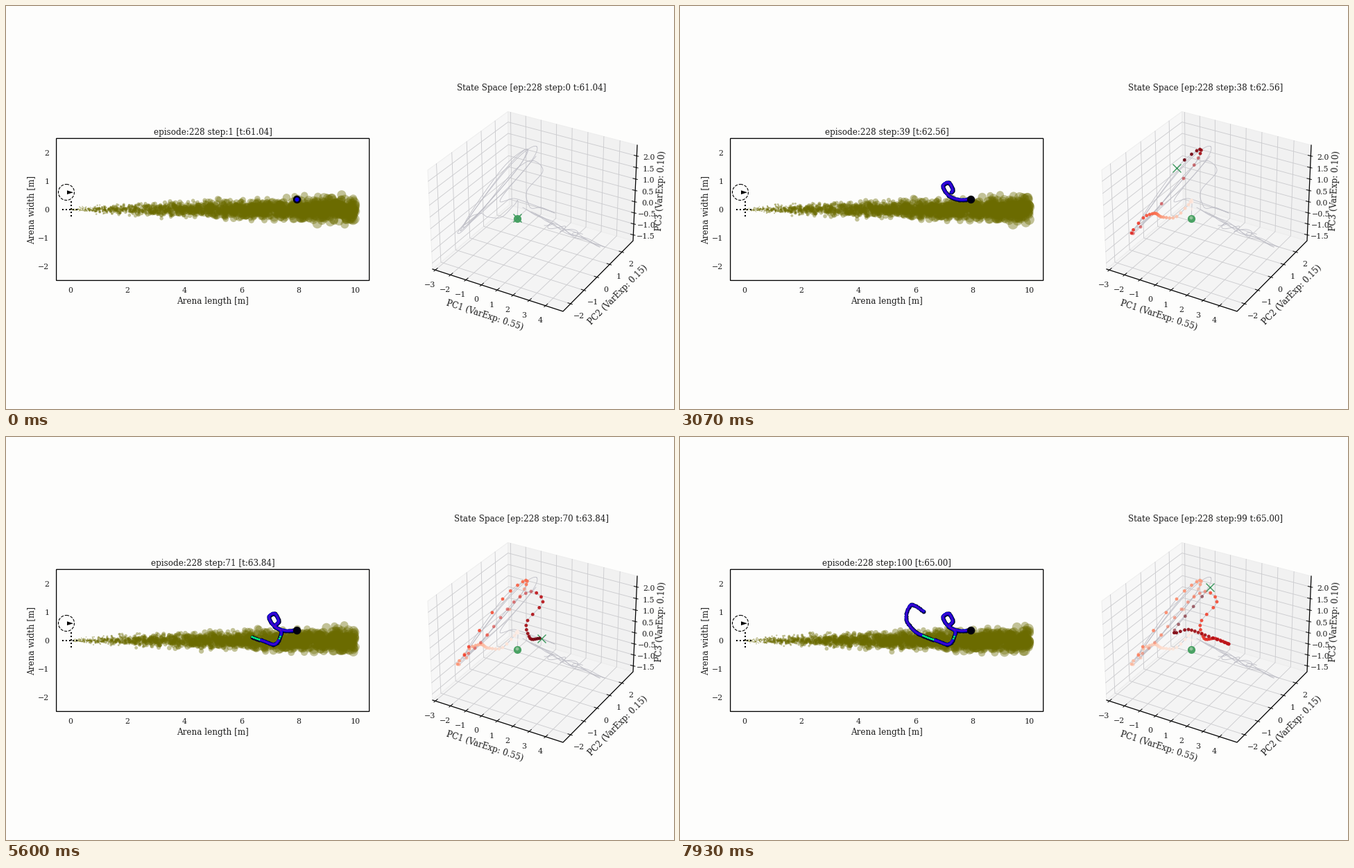
Write a matplotlib script that moves like this. It is 963 px wide and 582 px high and loops after 8 s.

```python
import numpy as np
import matplotlib.pyplot as plt
from matplotlib.animation import FuncAnimation
from matplotlib.patches import Circle, Polygon, Rectangle

W, H, DPI = 963, 582, 96
PT = 72 / DPI
STEPS, LOOP_MS = 100, 8000
INK = "#1f1f1f"
GREY = "#c0c0c8"

plt.rcParams["font.family"] = "DejaVu Serif"
fig = plt.figure(figsize=(W / DPI, H / DPI), dpi=DPI, facecolor="#fdfdfc")
ax = fig.add_axes([0, 0, 1, 1])
ax.set_xlim(0, W)
ax.set_ylim(H, 0)
ax.axis("off")


def text(x, y, s, size=12, rot=0):
    """Text centred on (x, y); upright text sits on its baseline."""
    va = "center" if rot else "baseline"
    return ax.text(x, y + (0 if rot else size / 3), s.replace("-", "\u2212"),
                   fontsize=size * PT, color=INK, ha="center", va=va, rotation=rot, zorder=9)


def line(pts, color=INK, lw=1.0, z=2, **kw):
    pts = np.asarray(pts, float)
    return ax.plot(pts[:, 0], pts[:, 1], color=color, lw=lw * PT, zorder=z, **kw)[0]


def dots(z, **kw):
    return ax.scatter([], [], linewidths=0, zorder=z, **kw)


def area(radius):
    return (2 * np.asarray(radius) * PT) ** 2


def smooth(times, pts, t):
    """Cubic Hermite curve through points placed at the given times."""
    times, pts = np.asarray(times, float), np.asarray(pts, float)
    slope = np.gradient(pts, times, axis=0)
    i = np.clip(np.searchsorted(times, t, "right") - 1, 0, len(times) - 2)
    h = (times[i + 1] - times[i])[:, None]
    s = (np.asarray(t) - times[i])[:, None] / h
    return ((2 * s**3 - 3 * s**2 + 1) * pts[i] + (s**3 - 2 * s**2 + s) * h * slope[i]
            + (3 * s**2 - 2 * s**3) * pts[i + 1] + (s**3 - s**2) * h * slope[i + 1])


steps = np.arange(STEPS)

# ---- arena ----
X0, Y0, UNIT = 93.2, 294, 41.03

ax.add_patch(Rectangle((72.6, 191.3), 451.1, 205.1, fill=False, ec="black",
                       lw=1.3 * PT, zorder=8, snap=False))
for v in range(0, 11, 2):
    text(X0 + v * UNIT, 410.5, str(v), 11)
for v in range(-2, 3):
    text(62.5, Y0 - v * UNIT, str(v), 11).set_ha("right")
text(298, 426, "Arena length [m]")
text(36.5, 294, "Arena width [m]", rot=90)
arena_title = text(298, 182, "")

ax.add_patch(Circle((87, 269), 11.5, fill=False, ec="black", lw=1.1 * PT,
                    ls=(0, (3.7, 1.6)), zorder=4))
ax.add_patch(Polygon([(88, 266.3), (97, 269.2), (88, 272)], fc="black", lw=0, zorder=4))
for cross in ([(81, 294), (106, 294)], [(93.5, 282), (93.5, 307)]):
    line(cross, "black", 2, 4, ls=(0, (1, 1.5)))

# ---- plume: puffs drift right at 0.02 m per step, spreading and growing ----
rng = np.random.default_rng(228)
COUNT = 2100
puff_x = rng.uniform(-2, 10, COUNT)
puff_z = np.clip(rng.normal(0, 1, COUNT), -2.9, 2.9)
puff_k = rng.uniform(0.7, 1.1, COUNT)
puffs = dots(3, color="#6b6b00", alpha=0.4)


def draw_plume(n):
    x = puff_x + 0.02 * n
    seen = (x > 0) & (x <= 10)
    x, z, k = x[seen], puff_z[seen], puff_k[seen]
    puffs.set_offsets(np.c_[X0 + x * UNIT, Y0 + 2.45 * z * np.sqrt(x)])
    puffs.set_sizes(area((0.4 + x**0.85) * k))


# ---- walker track: one key point about every seven steps ----
TRACK = [(419, 279), (402, 279.5), (387, 273.5), (379, 260), (387.5, 255), (393, 266),
         (388, 273.5), (397, 282), (388, 299), (371, 294.5), (353, 288), (337, 279.5),
         (326, 262), (333, 242.5), (351, 251.5)]
track = smooth(range(len(TRACK)), TRACK, np.linspace(0, len(TRACK) - 1, STEPS))
in_odor = np.abs(track[:, 1] - 289.5) < 3.5
track_color = np.where(in_odor[:, None], (0.0, 1.0, 0.5, 1.0), (0.05, 0.0, 0.92, 1.0))
track_area = area(np.where(in_odor, 1.5, 2.1))

track_rim = dots(5, color="#00002e")
track_dots = dots(6)
track_core = line([(0, 0)], "#d0106a", 1.0, 6.5, alpha=0.5)
start = ax.scatter([419], [279], s=area(5.7), color="#00000f", linewidths=0)


def draw_track(n):
    pts = track[:n + 1]
    track_rim.set_offsets(pts)
    track_rim.set_sizes([area(3.0)])
    track_dots.set_offsets(pts)
    track_dots.set_sizes(track_area[:n + 1] if n else [area(3.0)])
    track_dots.set_facecolors(track_color[:n + 1])
    track_core.set_data(np.where(in_odor[:n + 1], np.nan, pts[:, 0]), pts[:, 1])
    start.set_zorder(7 if n else 4.5)


# ---- state space box ----
L, F, R, B = (615, 380), (803, 441), (904, 339), (725.5, 287.2)
LT, RT, BT = (608, 237), (910, 201), (723.5, 152.5)


def face(*corners):
    """Perspective map of the unit square onto four corners."""
    rows, rhs = [], []
    for (u, v), (x, y) in zip(((0, 0), (1, 0), (1, 1), (0, 1)), corners):
        rows += [[u, v, 1, 0, 0, 0, -u * x, -v * x], [0, 0, 0, u, v, 1, -u * y, -v * y]]
        rhs += [x, y]
    m = np.append(np.linalg.solve(rows, rhs), 1).reshape(3, 3)

    def place(u, v):
        x, y, w = m @ (u, v, 1)
        return np.array((x / w, y / w))
    return place


floor, side, back = face(L, F, R, B), face(L, B, BT, LT), face(B, R, RT, BT)
for quad, shade in (((L, F, R, B), "0.957"), ((L, B, BT, LT), "0.97"), ((B, R, RT, BT), "0.947")):
    ax.add_patch(Polygon(quad, fc=shade, ec="0.93", lw=PT, zorder=1))


def tick(at, direction, offset, s):
    d = np.array(direction)
    line([at + 2.5 * d, at - 4 * d], lw=1.1, z=4)
    text(*(at + offset), s, 11)


def grid(*pts):
    line(pts, "#cccccf", 0.9, 1.5)


for v in range(-3, 5):
    u = (v + 3.18) / 8.24
    grid(floor(u, 0), back(u, 0), back(u, 1))
    tick(floor(u, 0), (-0.77, 0.64), (-8, 20.8), str(v))
for v in range(-2, 3):
    u = (v + 2.55) / 5.49
    grid(floor(1, u), side(u, 0), side(u, 1))
    tick(floor(1, u), (0.95, 0.31), (12.5, 17.3), str(v))
for v in np.arange(-1.5, 2.1, 0.5):
    u = (v + 1.77) / 4.227
    grid(side(0, u), side(1, u), back(1, u))
    tick(back(1, u), (0.97, 0.24), (18, 1.8), f"{v:.1f}")
line([L, F, R, RT], "black", lw=1.25, z=4)

text(690.5, 446.5, "PC1 (VarExp: 0.55)", rot=-18)
text(882, 417, "PC2 (VarExp: 0.15)", rot=45.3)
text(944.5, 267, "PC3 (VarExp: 0.10)", rot=87.5)
state_title = text(757.5, 118, "")

# ---- state path: turning points as (step, x, y) ----
STATE = np.array([
    (0, 737, 306), (2, 738, 283), (5, 733, 287), (8, 716, 304), (12, 697, 305),
    (19, 681, 300), (22, 668, 306), (25, 651, 328), (27, 664, 319), (29, 726, 249),
    (32, 750, 213), (35, 745, 209), (38, 716, 234), (42, 661, 315), (44, 676, 305),
    (51, 741, 231), (53, 757, 223), (56, 774, 238), (59, 752, 265), (63, 754, 288),
    (70, 772, 291), (77, 791, 299), (84, 757, 286), (89, 733, 278), (94, 713, 279),
    (99, 764, 217)])
state = smooth(STATE[:, 0], STATE[:, 1:], steps)

# Points climbing to the upper right lie further back and look paler.
climb = np.gradient(state[:, 0] - state[:, 1])
depth = np.where(climb > 8, 0.55, 0.92)
depth[0] = 0.4


def trace(pts):
    line(pts, GREY, 0.85, 3)


def ring(a, b, wide):
    """Slender loop from a to b, fuller towards b."""
    a, b = np.array(a), np.array(b)
    axis = (b - a) / 2
    normal = np.array((-axis[1], axis[0])) / np.hypot(*axis)
    t = np.linspace(0, 2 * np.pi, 120)[:, None]
    trace((a + b) / 2 + axis * np.cos(t) + wide * (1 + 0.5 * np.cos(t)) * np.sin(t) * normal)


trace(smooth(STATE[:, 0], STATE[:, 1:], np.linspace(0, 99, 500)))
ring((659, 320), (765, 203), 9)
ring((655, 325), (752, 207), 6)

s = np.linspace(0, 1, 80)
for k in range(4):
    wave = np.sin(np.pi * s) * (2 + 3 * np.sin(rng.uniform(9, 16) * s + 2 * k))
    trace(np.c_[745 + 6 * k + (118 - 6 * k - 7 * (k % 2)) * s,
                291 + 3 * k + (57 - 3 * k) * s + wave])
trace(np.c_[776 + 54 * s + 8 * np.sin(19 * s), 314 + 17 * s + 3 * np.cos(23 * s)])

ax.scatter([737], [306.5], s=area(5.6), color="#4aa264", linewidths=0, zorder=5)
cursor = ax.scatter([], [], s=area(6), marker="x", color="#3f9a60",
                    linewidths=1.4 * PT, zorder=6)
state_dots = dots(7)
reds = plt.get_cmap("Reds")


def draw_state(n):
    cursor.set_offsets(state[n:n + 1])
    colors = reds(np.linspace(0, 1, n)) if n else np.empty((0, 4))
    colors[:, 3] = depth[:n]
    state_dots.set_offsets(state[:n])
    state_dots.set_sizes([area(2.4)])
    state_dots.set_facecolors(colors)


def draw(n):
    t = 61.04 + 0.04 * n
    arena_title.set_text(f"episode:228 step:{n + 1} [t:{t:.2f}]")
    state_title.set_text(f"State Space [ep:228 step:{n} t:{t:.2f}]")
    draw_plume(n)
    draw_track(n)
    draw_state(n)
    return []


anim = FuncAnimation(fig, draw, frames=STEPS, interval=LOOP_MS / STEPS,
                     init_func=lambda: draw(0), repeat=True, repeat_delay=0)
plt.show()
```
